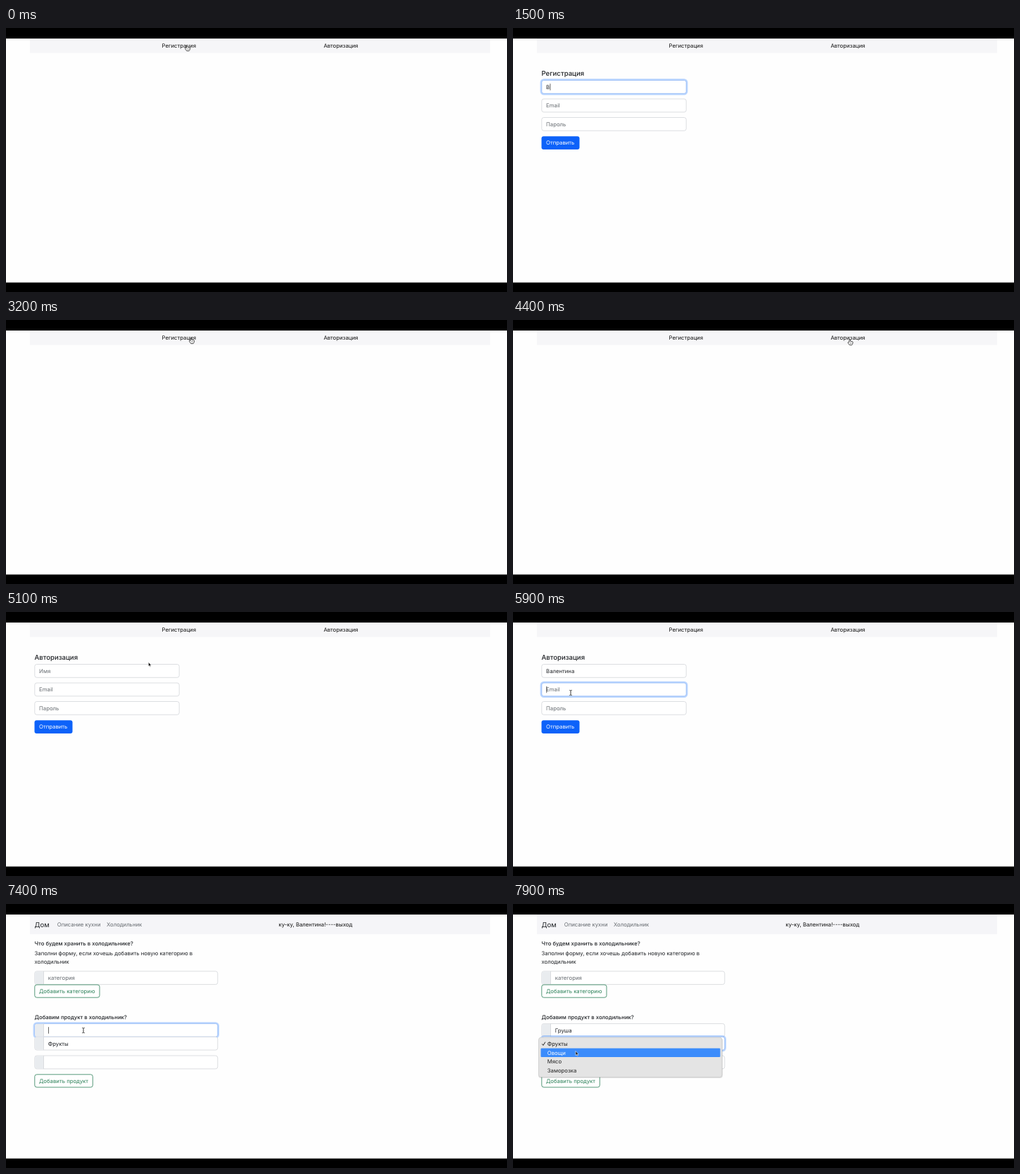
Write an HTML page that moves like this. It is 712 by 376 pixels and loops after 8 s.

```html
<!DOCTYPE html>
<html lang="ru">
<head>
<meta charset="utf-8">
<style>
  html, body { margin: 0; width: 100%; height: 100%; overflow: hidden; background: #fefefe; }
  svg { display: block; width: 712px; height: 376px; }
  text { font-family: Inter, sans-serif; text-rendering: geometricPrecision; white-space: pre; }
</style>
</head>
<body>
<svg id="stage" viewBox="0 0 712 376"></svg>
<script>
const LOOP = 8000, STEP = 100, SIZE = 7.75;
const INK = '#202327', MUTED = '#666b70', GREEN = '#2c8159';
const USER = 'Валентина', MAIL = 'na.nna@wvw.ru';
const stage = document.getElementById('stage');
const pen = document.createElement('canvas').getContext('2d');
pen.font = SIZE + 'px Inter, sans-serif';

const rect = (x, y, w, h, fill, more = '') =>
  `<rect x="${x}" y="${y}" width="${w}" height="${h}" fill="${fill}" ${more}/>`;
const label = (x, y, s, fill = INK, size = SIZE, weight = 400) =>
  `<text x="${x}" y="${y}" fill="${fill}" font-size="${size}" font-weight="${weight}">${s}</text>`;

// Part of a string typed at time t, rate in letters per step
const typed = (s, t, start, rate = 2) =>
  s.slice(0, Math.max(0, Math.floor((t - start) / STEP * rate + 1.001)));

// Bootstrap-like box; focus 0..1 sets the strength of the blue ring
function box(x, y, w, h, focus = 0) {
  const ring = focus ? rect(x - 1, y - 1, w + 2, h + 2, 'none',
    `rx="4" stroke="#0d6efd" stroke-opacity="${.28 * focus}" stroke-width="2.4"`) : '';
  return ring + rect(x, y, w, h, '#fff',
    `rx="3" stroke="${focus ? '#8fb6f5' : '#d3d6da'}" stroke-width=".8"`);
}

function input(x, y, w, value, hint, focus = 0, caret = false, pad = 6.3) {
  let out = box(x, y, w, 18.8, focus);
  out += label(x + pad, y + 12.4, value || hint, value ? INK : MUTED);
  if (caret) {
    const cx = x + pad + pen.measureText(value).width + .4;
    out += rect(cx, y + 4.8, .7, 9.4, '#222');
  }
  return out;
}

const navLinks = () => rect(34, 15, 654, 20.5, '#f6f6f8') +
  label(221.6, 28.3, 'Регистрация', '#111') + label(451.4, 28.3, 'Авторизация', '#111');

function form(t, title, values, focusTimes, caretOn) {
  const active = focusTimes.filter(at => at <= t).length - 1;
  const switching = focusTimes[active] === t;
  const level = i => i === active ? (switching ? .35 : 1)
    : i === active - 1 && switching ? .55 : 0;
  const hints = ['Имя', 'Email', 'Пароль'];
  return label(40.5, 68.3, title, INK, 9.6, 500) +
    hints.map((hint, i) => input(40.8, 74.5 + 26.5 * i, 205.4, values[i], hint,
      level(i), caretOn && i === active)).join('') +
    rect(40.5, 154.3, 54, 18.8, '#0d62f9', 'rx="3"') +
    label(47, 166.4, 'Отправить', '#fff');
}

function group(y, value, hint, focus, caret) {
  return input(40.8, y, 260, value, hint, focus, caret, 19) +
    `<path d="M53.5 ${y + .4}H43.8a2.6 2.6 0 0 0-2.6 2.6v12.8a2.6 2.6 0 0 0 2.6 2.6h9.7z" fill="#e9ecef"/>` +
    rect(53.1, y, .8, 18.8, '#d3d6da');
}

const outlineButton = (y, w, s) =>
  rect(40.8, y, w, 18.2, '#fff', `rx="3" stroke="${GREEN}" stroke-width=".8"`) +
  label(47, y + 11.9, s, GREEN);

function menu(hover) {
  const items = ['Фрукты', 'Овощи', 'Мясо', 'Заморозка'];
  return rect(36, 190.5, 262, 57.5, '#000', 'rx="4" opacity=".12"') +
    rect(36.5, 190, 260.5, 56.6, '#e4e4e4', 'rx="3.5" stroke="#c4c4c4" stroke-width=".6"') +
    rect(39.5, 192.8 + 12.8 * hover, 255, 12.5, '#3b8cfb', 'rx="1"') +
    items.map((s, i) => label(48.8, 201.8 + 12.8 * i, s, i === hover ? '#fff' : '#222')).join('') +
    `<path d="M41.3 199.3l1.6 2 3-4.8" fill="none" stroke="${hover ? '#222' : '#fff'}"/>`;
}

function home(t) {
  const open = t >= 7700;
  return rect(34, 15, 654, 28, '#f5f5f8') +
    label(40.5, 33, 'Дом', INK, 9.7) +
    label(72.8, 32.4, 'Описание кухни', MUTED) + label(143, 32.4, 'Холодильник', MUTED) +
    label(387.5, 32.4, `ку-ку, ${USER}!----выход`, '#111') +
    label(40.5, 58.8, 'Что будем хранить в холодильнике?', INK, SIZE, 500) +
    label(40.5, 73.2, 'Заполни форму, если хочешь добавить новую категорию в') +
    label(40.5, 84.8, 'холодильник') +
    group(95.8, '', 'категория') +
    outlineButton(115, 92.2, 'Добавить категорию') +
    label(40.5, 164.4, 'Добавим продукт в холодильник?', INK, SIZE, 500) +
    group(170.4, typed('Груша', t, 7500, 4), '', t >= 7400 && !open ? 1 : 0, t >= 7400 && !open) +
    group(189.2, 'Фрукты', '', open ? 1 : 0) +
    group(216, '', '') +
    outlineButton(242.8, 82.5, 'Добавить продукт') +
    (open ? menu(t >= 7900 ? 1 : 0) : '');
}

// Each stroke of the pointer: points of time, x, y
const moves = [
  [[0, 258, 28], [300, 258, 28], [900, 130, 86], [1400, 130, 86]],
  [[2800, 130, 122], [2900, 130, 136]],
  [[3200, 264, 29], [3900, 264, 29], [4400, 479.5, 31], [4800, 479.5, 31], [5200, 110, 85]],
  [[5800, 82, 112], [5900, 82, 115]],
  [[6800, 82, 122], [6900, 84.5, 132], [7000, 84.5, 136]],
  [[7300, 100, 160], [7400, 110, 180]],
  [[7700, 89, 199], [7900, 89, 209.5]]
];

const cursors = {
  hand: '<path d="M-1.6 .4V-3.2q.8-1 1.5 0V-.9l2.6.5q1.2.3 1.1 1.5L3 3.3 2.2 4.6H-1.2L-3.5 1.4q-.1-1 .8-.9z" fill="#fff" stroke="#222" stroke-width=".8"/><path d="M-.2 1v2M1.3 1v2" stroke="#444" stroke-width=".5"/>',
  beam: '<path d="M-1.7-3.6Q-.2-3.6 0-2.7Q.2-3.6 1.7-3.6M0-2.7V2.7M-1.7 3.6Q-.2 3.6 0 2.7Q.2 3.6 1.7 3.6" fill="none" stroke="#222" stroke-width=".9"/>',
  arrow: '<path d="M0 0V6L1.4 4.8 2.3 6.8 3.3 6.4 2.4 4.4H4.2z" fill="#111" stroke="#fff" stroke-width=".6"/>'
};

function pointer(t) {
  const path = moves.find(m => t >= m[0][0] && t <= m.at(-1)[0]);
  if (!path) return '';
  const i = Math.max(1, path.findIndex(p => p[0] >= t));
  const [a, b] = [path[i - 1], path[i]];
  const k = (t - a[0]) / (b[0] - a[0]);
  const x = a[1] + (b[1] - a[1]) * k, y = a[2] + (b[2] - a[2]) * k;
  const inField = t < 7300
    ? x < 246 && [74, 101, 127].some(top => y >= top && y <= top + 19)
    : t < 7700 && y > 170;
  const onLink = y < 36 && (x > 221 && x < 272 || x > 451 && x < 502);
  const kind = onLink ? 'hand' : inField ? 'beam' : 'arrow';
  return `<g transform="translate(${x} ${y})">${cursors[kind]}</g>`;
}

function page(t) {
  if (t >= 7300) return home(t);
  let body = '';
  if (t >= 300 && t < 3200) {
    body = form(t, 'Регистрация',
      [typed(USER, t, 1500, 1.6), typed(MAIL, t, 2200), typed('••••', t, 3000)],
      [1000, 2100, 2900], true);
  } else if (t >= 4700) {
    body = form(t, 'Авторизация',
      [typed(USER, t, 5300), typed(MAIL, t, 6000), typed('••••', t, 7100)],
      [5200, 5800, 7000], t < 6800 || t >= 7000);
  }
  return navLinks() + body;
}

let shown = -1;
function tick() {
  const t = Math.floor(performance.now() % LOOP / STEP) * STEP;
  if (t !== shown) {
    shown = t;
    stage.innerHTML = rect(0, 0, 712, 376, '#fefefe') + page(t) + pointer(t) +
      rect(0, 0, 712, 15, '#000') + rect(0, 362.5, 712, 13.5, '#000');
  }
  requestAnimationFrame(tick);
}
tick();
</script>
</body>
</html>
```
